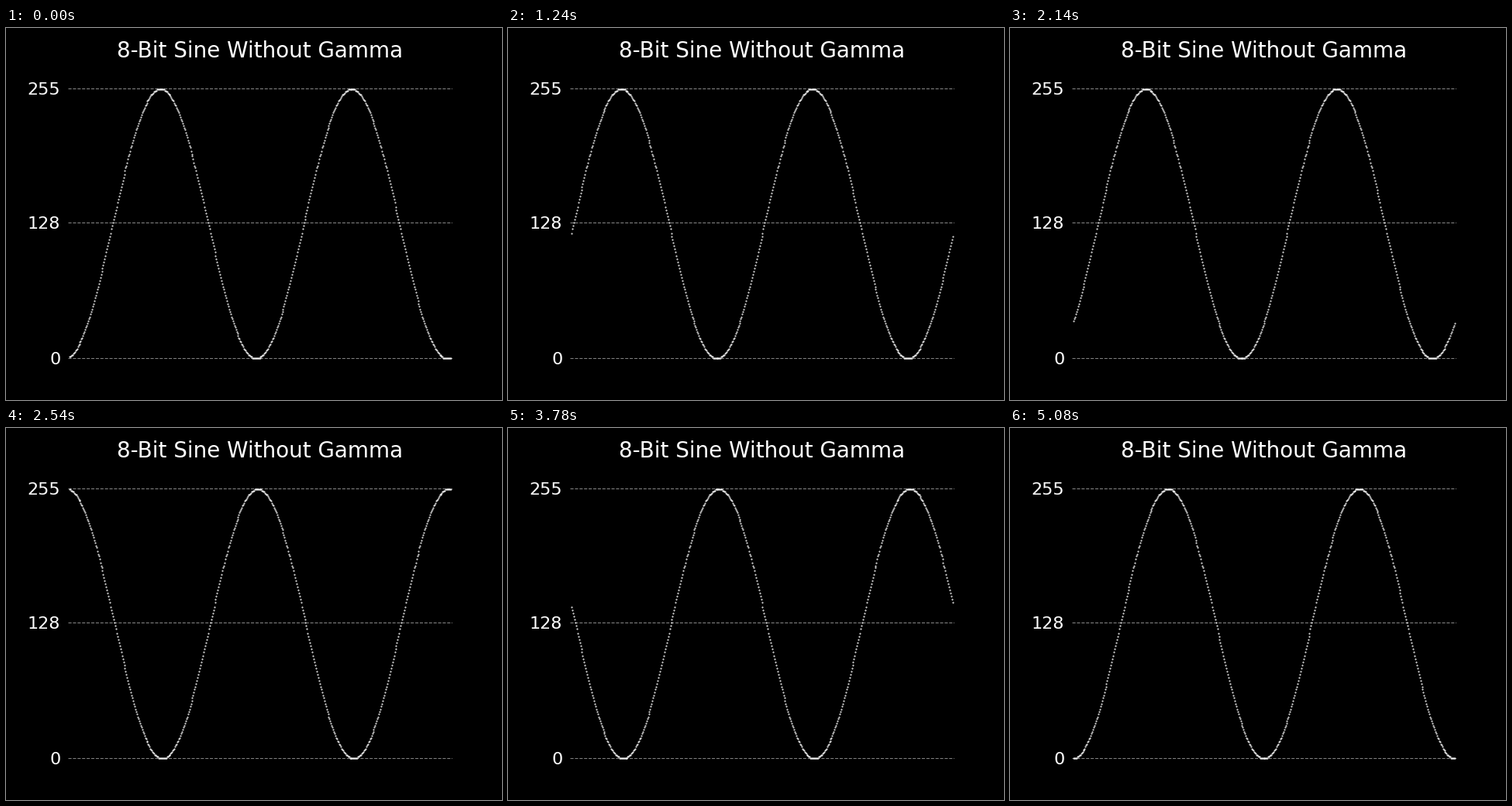
Animation of 640x480 px, one loop 5.1 s. Source, as a matplotlib script:

```python
import numpy as np
import matplotlib.pyplot as plt
from matplotlib.animation import FuncAnimation

STEPS = 255        # samples in one period
SHIFT = 5          # samples scrolled per frame
FRAMES = 255
INTERVAL = 20      # ms

phase = 2 * np.pi * np.arange(STEPS) / STEPS
table = np.floor(127.5 * (1 - np.cos(phase)) + 1e-9)
x = np.arange(2 * STEPS)


def levels(frame):
    return table[(x + SHIFT * frame + 6) % STEPS]


fig, ax = plt.subplots(figsize=(6.4, 4.8), dpi=100, facecolor="black")
fig.subplots_adjust(left=0.125, right=0.9, bottom=0.11, top=0.88)
ax.set_facecolor("black")
ax.set_xlim(-2, 511)
ax.set_ylim(-1, 270)
ax.set_title("8-Bit Sine Without Gamma", color="white", fontsize=20, y=1.03)
ax.set_xticks([])
ax.set_yticks([0, 128, 255])
ax.tick_params(axis="y", length=0, pad=7, labelsize=16, labelcolor="white")
ax.grid(axis="y", color="gray", linestyle="--", linewidth=0.8)
ax.set_axisbelow(True)
for spine in ax.spines.values():
    spine.set_visible(False)

dots, = ax.plot(x, levels(0), ".", color="white", markersize=1)


def update(frame):
    dots.set_ydata(levels(frame))
    return dots,


anim = FuncAnimation(fig, update, frames=FRAMES, interval=INTERVAL,
                     repeat=True, repeat_delay=0, blit=True)
plt.show()
```
